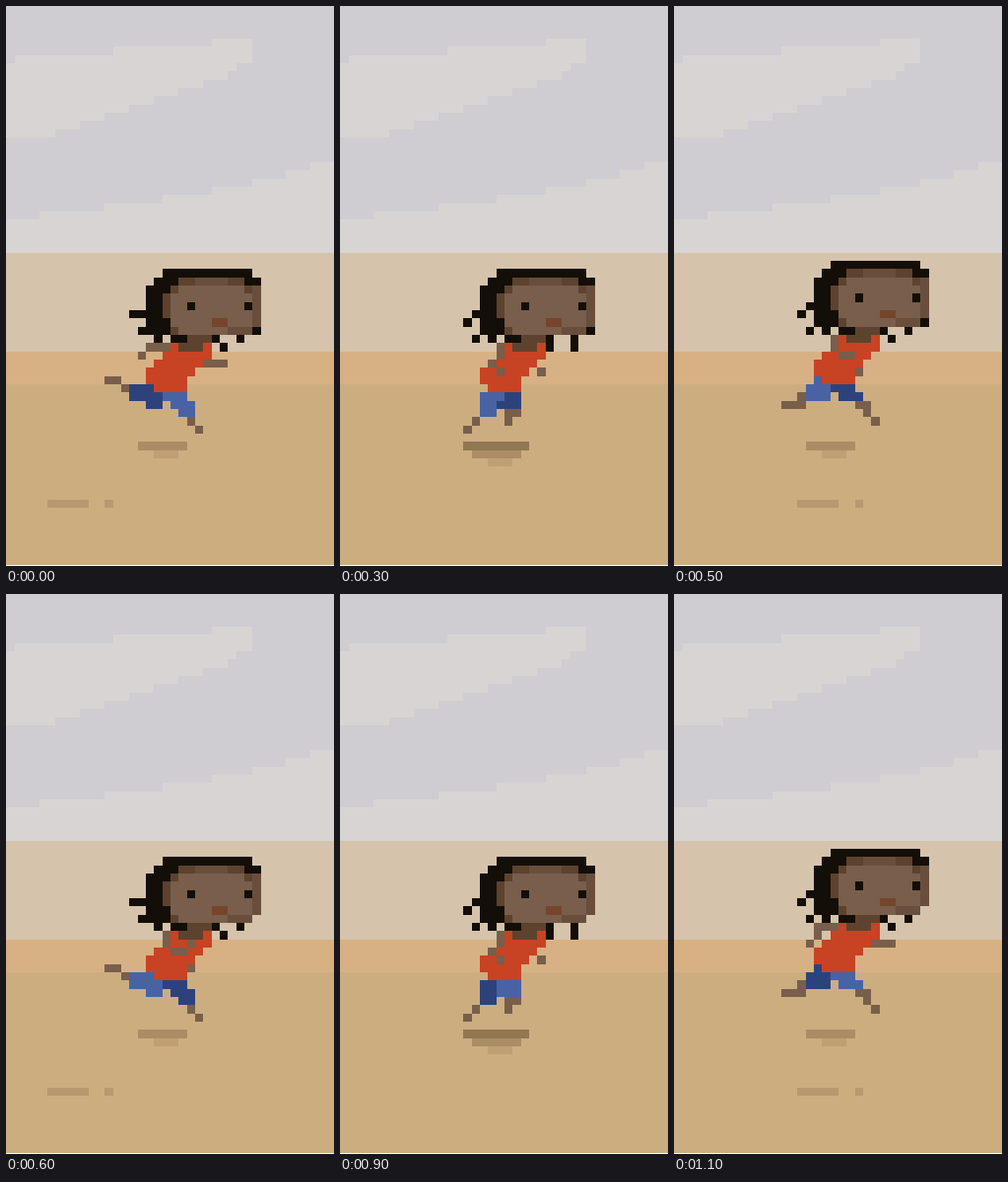
An HTML page with a canvas that plays this animation: 333 by 567 pixels, repeating every 1.2 s.

```html
<!DOCTYPE html>
<html lang="en">
<head>
<meta charset="utf-8">
<title>Runner</title>
<style>
  html, body { margin: 0; width: 333px; height: 567px; overflow: hidden; background: #fff; }
  canvas { display: block; }
</style>
</head>
<body>
<canvas id="stage" width="333" height="567"></canvas>
<script>
const ctx = document.getElementById('stage').getContext('2d');
const UNIT = 25 / 3;
const STEP = 100, STEPS = 12, STRIDE = 6;
const C = {
  sky: '#cfcdd1', cloud: '#d7d4d3', haze: '#d5c3ab', dune: '#d7b184', sand: '#ccad80',
  hair: '#140e08', skin: '#785e4b', tint: '#694f3b', shade: '#5d432e', mouth: '#75452e', shirt: '#c74323',
  near: '#4962a4', far: '#2d427b',
  dark: '#917852', mid: '#ab8d65', faint: '#bf9f74', dash: '#b8996f'
};

const col = x => Math.ceil(x * UNIT - 1e-6);
const row = y => Math.floor(y * UNIT + 1e-6);

// Fills one box measured in art cells
function box(color, x, y, w = 1, h = 1) {
  ctx.fillStyle = C[color];
  ctx.fillRect(col(x), row(y), col(x + w) - col(x), row(y + h) - row(y));
}

// Fills every cell close to the line from a to b, tapering from ra to rb
function limb(color, [ax, ay], [bx, by], ra = 0.55, rb = ra) {
  const dx = bx - ax, dy = by - ay, len2 = dx * dx + dy * dy;
  for (let y = Math.floor(Math.min(ay, by) - ra); y <= Math.max(ay, by) + ra; y++) {
    for (let x = Math.floor(Math.min(ax, bx) - ra); x <= Math.max(ax, bx) + ra; x++) {
      const t = Math.min(1, Math.max(0, ((x - ax) * dx + (y - ay) * dy) / len2));
      const gap = Math.hypot(x - ax - t * dx, y - ay - t * dy);
      if (gap <= ra + (rb - ra) * t) box(color, x, y);
    }
  }
}

function background() {
  box('sky', 0, 0, 40, 30);
  for (let y = 4; y < 16; y++) {
    const left = Math.max(0, 25 - 12 * (y - 4));
    const right = Math.min(y < 7 ? 30 : 28, 51 - 3 * y);
    box('cloud', left, y, right - left);
  }
  for (let k = 0; k < 11; k++) {
    const left = Math.max(0, 37 - 3 * k - k * (k - 1) / 2);
    box('cloud', left, 19 + k, 40 - left);
  }
  box('haze', 0, 30, 40, 12);
  box('dune', 0, 42, 40, 4);
  box('sand', 0, 46, 40, 22);
}

function ground(phase) {
  const x = 25 - 10 * ((phase + 2) % STRIDE);
  if (x >= -5) {
    box('dash', x, 60, 5);
    box('dash', x + 7, 60);
  }
  const landed = phase > 0 && phase < 4;
  [['dark', 15, 8], ['mid', 16, 6], ['faint', 18, 3]]
    .slice(landed ? 0 : 1)
    .forEach(([tone, left, w], i) => box(tone, left, 53 + i, w));
}

// Key points of one leg: time, knee x, knee y, foot x, foot y
const gait = [
  [0, 21.5, 49, 23, 51],
  [1, 20.5, 49, 20, 51],
  [3, 17, 49, 15, 51],
  [5, 16.5, 48, 13, 49],
  [6, 15, 46, 12, 45],
  [7, 18, 49, 16, 50],
  [9, 21, 48, 20, 50],
  [11, 21.5, 48, 24, 51],
  [12, 21.5, 49, 23, 51]
];

function leg(color, step, dy) {
  const t = step % STEPS;
  const i = gait.findIndex(key => key[0] > t);
  const a = gait[i - 1], b = gait[i];
  const f = (t - a[0]) / (b[0] - a[0]);
  const [, kx, ky, fx, fy] = a.map((v, n) => v + (b[n] - v) * f);
  const hip = [18.8 + 1.5 * Math.cos((t + 1) * Math.PI / 6), 47 + dy];
  const knee = [kx, ky + dy];
  limb('skin', knee, [fx, fy + dy]);
  limb(color, hip, knee, 1.4, 0.9);
}

function torso(dy) {
  for (let y = 41; y < 47; y++) {
    const left = 16.5 + Math.abs(y - 44.5);
    const right = Math.min(24, Math.max(21, 66 - y));
    box('shirt', left, y + dy, right - left + 1);
  }
  box('shade', 21, 41 + dy, 3);
}

function farArm(swing, dy) {
  limb('skin', [23, 43 + dy], [23.7 + 2.3 * swing, 44 - swing + dy]);
}

function nearArm(swing, dy) {
  const elbow = [18.4 - 1.4 * swing, 43 - 2 * Math.max(0, swing) + dy];
  const hand = [18.9 - 3 * swing, 44 - 1.6 * Math.abs(swing) + dy];
  limb('skin', [19, 41 + dy], elbow, 0.5);
  limb('skin', elbow, hand, 0.5);
}

function head(step, dy) {
  const phase = step % STRIDE;
  const part = (color, x, y, w, h) => box(color, x, y + dy, w, h);
  // Skull and hair
  part('hair', 19, 32, 11);
  part('hair', 18, 33, 13);
  part('hair', 17, 34, 3, 6);
  part('hair', 20, 40, 2);
  // Face
  part('skin', 20, 34, 11, 5);
  part('skin', 20, 39, 10);
  part('shade', 21, 33, 8);
  part('tint', 23, 33, 4);
  part('shade', 20, 34);
  part('shade', 19, 35, 1, 3);
  part('shade', 20, 39);
  part('shade', 22, 40, 3);
  part('shade', 29, 34);
  part('tint', 30, 34, 1, 5);
  part('tint', 27, 39, 3);
  part('hair', 22, 36);
  part('hair', 29, 36);
  part('mouth', 25, 38, 2);
  // Loose locks sink as the body rises
  const droop = phase > 1 ? 1 : 0;
  const hang = droop && phase < 5 ? 1 : 0;
  part('hair', 16, 37);
  part('hair', 15, 37 + droop);
  part('hair', 16, 39 + droop);
  part('hair', 18, 40);
  part('hair', 25, 40);
  part('hair', 26 - hang, 41);
  part('hair', 28, 40, 1, 1 + hang);
  if (step < STRIDE) part('hair', 30, 39);
}

function draw(step) {
  const phase = step % STRIDE;
  const dy = Math.round(1.6 * Math.sin((phase + 0.2) * Math.PI / 3) - 0.15);
  const swing = Math.cos(step * Math.PI / 6);
  ctx.clearRect(0, 0, 333, 567);
  background();
  ground(phase);
  farArm(swing, dy);
  leg('far', step + STRIDE, dy);
  leg('near', step, dy);
  torso(dy);
  nearArm(swing, dy);
  head(step, dy);
}

const start = performance.now();
function tick() {
  draw(Math.floor((performance.now() - start) / STEP) % STEPS);
  requestAnimationFrame(tick);
}
tick();
</script>
</body>
</html>
```
